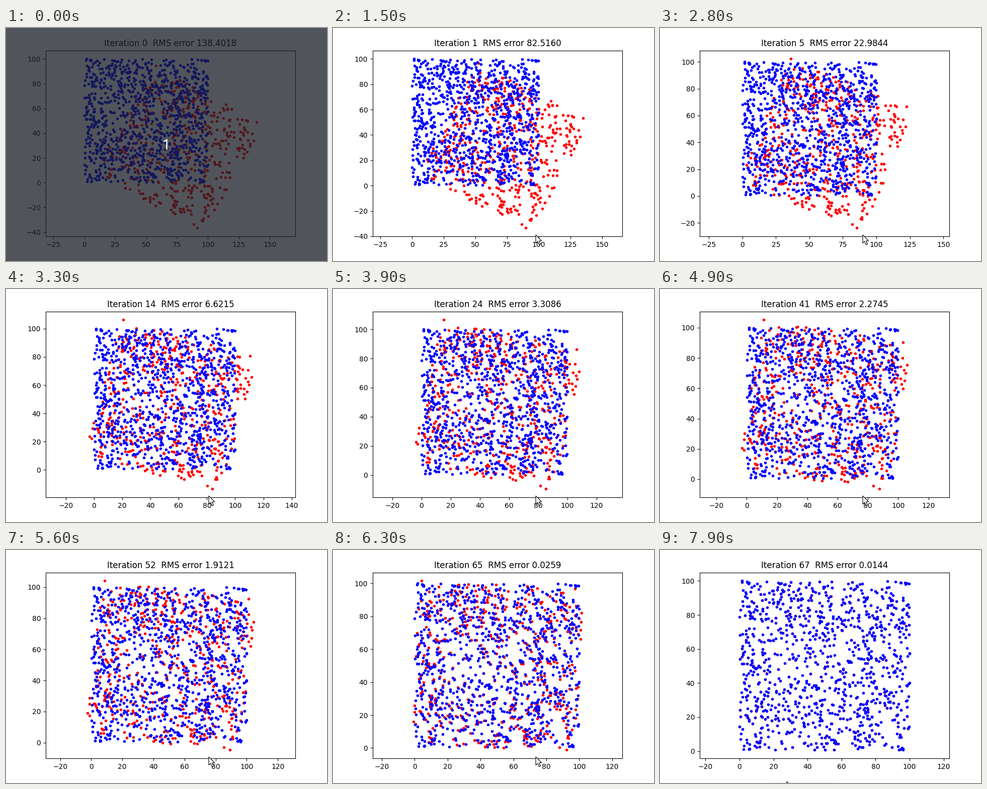
A matplotlib script that plays this animation: 638 by 463 pixels, repeating every 8000 ms.

```python
import numpy as np
import matplotlib.pyplot as plt
from matplotlib.animation import FuncAnimation
from matplotlib.patches import Polygon, Rectangle

W, H, DPI = 638, 463, 100
STEP_MS, FRAMES = 100, 80
N_BLUE, N_RED = 1000, 480
LAST = 67  # iteration at which the fit has converged

# Error shown in the title, interpolated on log scales between these iterations
ERROR = {0: 138.4018, 1: 82.516, 5: 22.9844, 24: 3.3086, 41: 2.2745,
         52: 1.9121, LAST: 0.0144}

ARROW = np.array([(0, 0), (0, 16.5), (3.8, 13), (6.6, 19.6), (9.4, 18.4),
                  (6.7, 12), (11.6, 11.8)])


def make_clouds():
    """Blue fills a square; red is a subset that reaches only a few corners."""
    rng = np.random.default_rng(12)
    corners = [(1.6, 100), (95, 98.9), (93.9, 0.9), (99.8, 84.5)]
    fill = rng.uniform(0, 100, (N_BLUE, 2))
    inner = fill[np.abs(fill - 50).sum(axis=1) < 88]
    return np.vstack([corners, fill]), np.vstack([corners, inner[:N_RED]])


def spin(pts, deg):
    """Rotate row vectors counter-clockwise about the origin."""
    a = np.radians(deg)
    c, s = np.cos(a), np.sin(a)
    return pts @ np.array([[c, s], [-s, c]])


def settle(it, fast, tau, slow):
    """Quick exponential approach plus a slow part that ends at LAST."""
    return fast * np.exp(-it / tau) + slow * np.sqrt(1 - it / LAST)


def pose(it):
    centre = (50 + settle(it, 24.15, 6, 2.3), 50 - settle(it, 20.3, 7, 2.2))
    return spin(red - 50, -settle(it, 15.25, 9, 13.4)) + centre


def error(it):
    return np.exp(np.interp(np.log1p(it), np.log1p(list(ERROR)),
                            np.log(list(ERROR.values()))))


def iteration(n):
    if n < 25:
        return int(n >= 15)
    return int(round(np.interp(n, [25, 28, 49, 50, 64], [2, 5, 41, 41, LAST])))


def pointer(n):
    steps = [9, 11, 70, 73, 75, 79]
    return np.round([np.interp(n, steps, [406, 403, 403, 400, 400, 252]),
                     np.interp(n, steps, [420, 411, 411, 415, 415, 460])])


blue, red = make_clouds()
fig = plt.figure(figsize=(W / DPI, H / DPI), dpi=DPI, facecolor="white")
ax = fig.add_axes([79 / W, 48.8 / H, 496 / W, 369.6 / H])

# Pixel-space layer for the dimmed countdown and the pointer
stage = fig.add_axes([0, 0, 1, 1], zorder=5)
stage.set(xlim=(0, W), ylim=(H, 0))
stage.axis("off")
shade = stage.add_patch(Rectangle((0, 0), W, H, lw=0, alpha=0.76,
                                  fc=(26 / 255, 32 / 255, 40 / 255)))
count, = stage.plot([313.5, 319.5, 319.5], [225.5, 222.5, 242], color="#ececee",
                    lw=1.9, solid_capstyle="butt", solid_joinstyle="miter")
shadow = stage.add_patch(Rectangle((225, 461.5), 118, 1.5, fc="#ececec", lw=0))
arrow = stage.add_patch(Polygon(ARROW, closed=True, fc="white", ec="#15151f", lw=0.9))


def draw(n):
    it = iteration(n)
    ax.cla()
    ax.axis("equal")
    ax.scatter(*pose(it).T, marker=".", color="red")
    ax.scatter(*blue.T, marker=".", color="blue")
    ax.set_title(f"Iteration {it}  RMS error {error(it):.4f}")

    counting = n < 5
    shade.set_visible(counting)
    count.set_visible(counting)
    arrow.set_visible(not counting)
    arrow.set_xy(ARROW + pointer(n))
    shadow.set_visible(n == FRAMES - 1)
    return []


anim = FuncAnimation(fig, draw, frames=FRAMES, interval=STEP_MS, repeat=True,
                     repeat_delay=0, blit=False)
plt.show()
```
